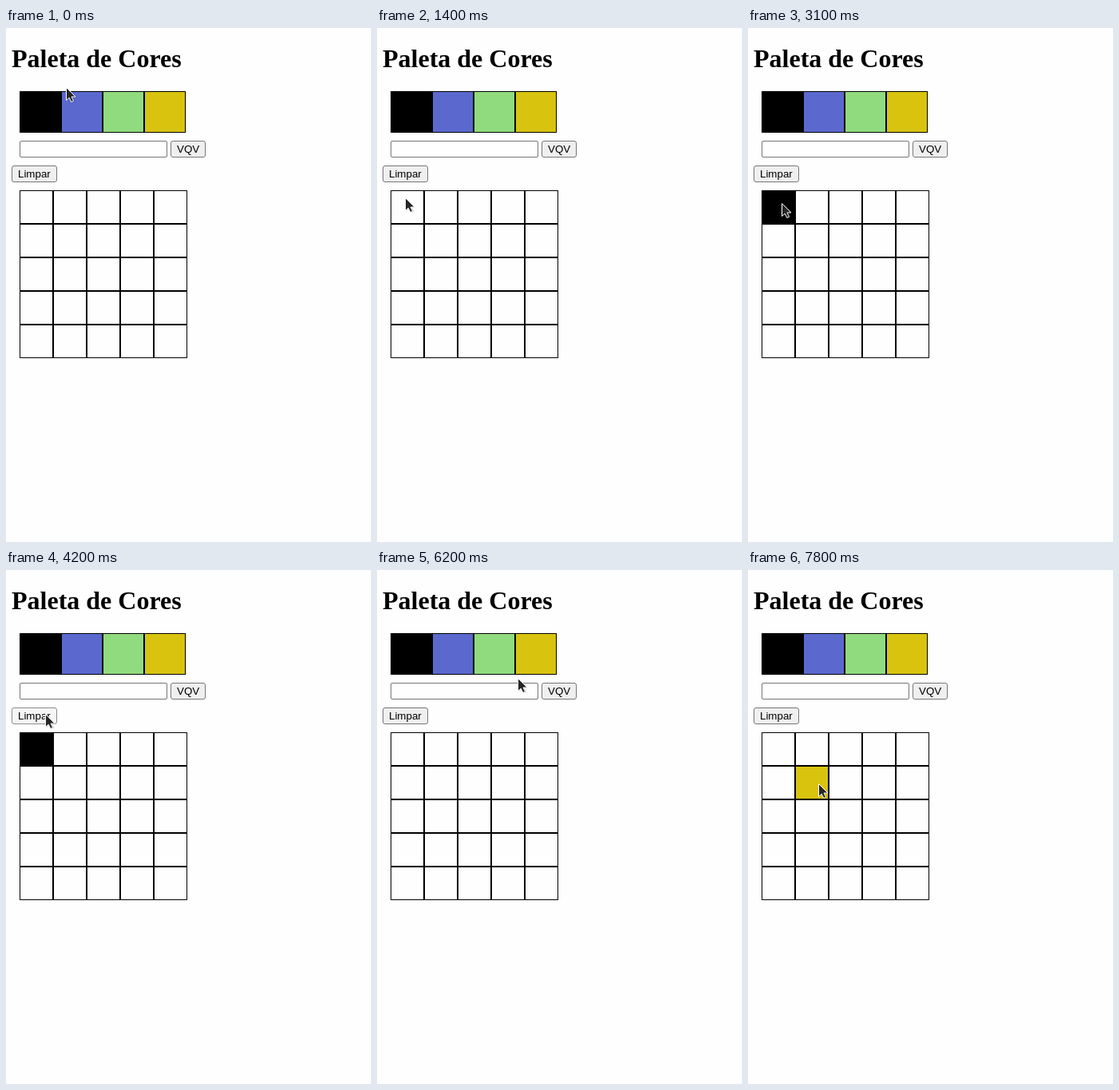
An HTML page that plays this animation: 457x643 px, repeating every 8000 ms.

```html
<!DOCTYPE html>
<html lang="pt">
<head>
<meta charset="utf-8">
<title>Paleta de Cores</title>
<style>
  html, body { margin: 0; width: 100%; height: 100%; overflow: hidden; background: #fefefe; }
  svg { display: block; }
  .title { font: bold 32px "Liberation Serif", serif; }
  .label { font: 13.333px "Liberation Sans", sans-serif; }
</style>
</head>
<body>
<svg id="stage" width="457" height="643" viewBox="0 0 457 643">
  <text class="title" x="7" y="49">Paleta de Cores</text>
  <g id="boxes" stroke="#000"></g>
  <g stroke="#767676">
    <rect id="field" x="17.5" y="141.5" width="184" height="20" rx="1.5" fill="#fefefe"/>
    <rect x="206.5" y="141.5" width="43" height="20" rx="2.5" fill="#efefef"/>
    <rect id="clear" x="7.5" y="172.5" width="56" height="20" rx="2.5" fill="#efefef"/>
  </g>
  <g id="spinner">
    <rect x="183" y="144" width="15" height="15" fill="#efefef"/>
    <path d="M186.5 150l4-4 4 4zM186.5 152l4 4 4-4z" fill="#505050"/>
  </g>
  <text class="label" x="214" y="156">VQV</text>
  <text class="label" x="15" y="187">Limpar</text>
  <g id="cursor">
    <path d="M2.500 2.500v16l4-3.500 3 5 3-1.500-2.500-5h4z" fill="#000" opacity=".15"/>
    <path d="M1.500 1.500v16l3.700-3.300 2.600 5.300 2.800-1.300-2.600-5.200h5z" fill="#262626" stroke="#fff"/>
  </g>
</svg>
<script>
const LOOP = 8000, STEP = 100;
const PAPER = '#fefefe', YELLOW = '#d8c30f', GREY = '#767676', DARK = '#4f4f4f';
const byId = id => document.getElementById(id);
const [boxes, field, clear, spinner, cursor] =
  ['boxes', 'field', 'clear', 'spinner', 'cursor'].map(byId);

function addBox(x, y, size, fill) {
  const box = document.createElementNS('http://www.w3.org/2000/svg', 'rect');
  const attrs = { x: x + .5, y: y + .5, width: size - 1, height: size - 1, fill };
  for (const key in attrs) box.setAttribute(key, attrs[key]);
  return boxes.appendChild(box);
}

['#000', '#5b68cd', '#90db7e', YELLOW].forEach((c, i) => addBox(17 + i * 52, 79, 52, c));
const cells = Array.from({ length: 25 }, (_, i) =>
  addBox(17 + i % 5 * 42, 203 + Math.floor(i / 5) * 42, 42, PAPER));

// Pointer gestures: first step, last step, resting place
const home = [74, 73];
const moves = [
  { from: 300, to: 400, at: [91, 59] },
  { from: 600, to: 900, at: [48, 94] },     // black swatch
  { from: 1200, to: 1400, at: [34, 211] },
  { from: 1500, to: 1800, at: [40, 232] },  // first cell
  { from: 3100, to: 3100, at: [41, 218] },
  { from: 3200, to: 3300, at: [41, 189] },
  { from: 3500, to: 3600, at: [46, 178] },  // clear button
  { from: 4000, to: 4000, at: [48, 179] },
  { from: 4800, to: 4800, at: [61, 174] },
  { from: 4900, to: 5100, at: [194, 98] },  // yellow swatch
  { from: 6200, to: 6200, at: [175, 134] },
  { from: 6300, to: 6800, at: [87, 266] }   // second cell
];

const easeOut = k => 1 - (1 - k) ** 1.5;

function pointerAt(t) {
  return moves.reduce((pos, { from, to, at }) => {
    const k = (t - from + STEP) / (to - from + STEP);
    const e = easeOut(Math.min(1, Math.max(0, k)));
    return pos.map((v, i) => v + (at[i] - v) * e);
  }, home).map(Math.round);
}

function draw(ms) {
  const t = Math.floor(ms % LOOP / STEP) * STEP;
  const within = (from, to) => t >= from && t < to;

  cells[0].setAttribute('fill', within(2400, 4300) ? '#000' : PAPER);
  cells[6].setAttribute('fill', within(7800, LOOP) ? YELLOW : PAPER);

  const pressed = within(4200, 4300), hovered = within(3300, 4800);
  clear.setAttribute('fill', pressed ? '#f5f5f5' : hovered ? '#e5e5e5' : '#efefef');
  clear.setAttribute('stroke', pressed ? '#8d8d8d' : hovered ? DARK : GREY);

  const inField = within(4800, 4900);
  field.setAttribute('stroke', inField ? DARK : GREY);
  spinner.setAttribute('visibility', inField ? 'visible' : 'hidden');

  cursor.setAttribute('transform', `translate(${pointerAt(t)})`);
}

const start = performance.now();
function tick() {
  draw(performance.now() - start);
  requestAnimationFrame(tick);
}
tick();
</script>
</body>
</html>
```
